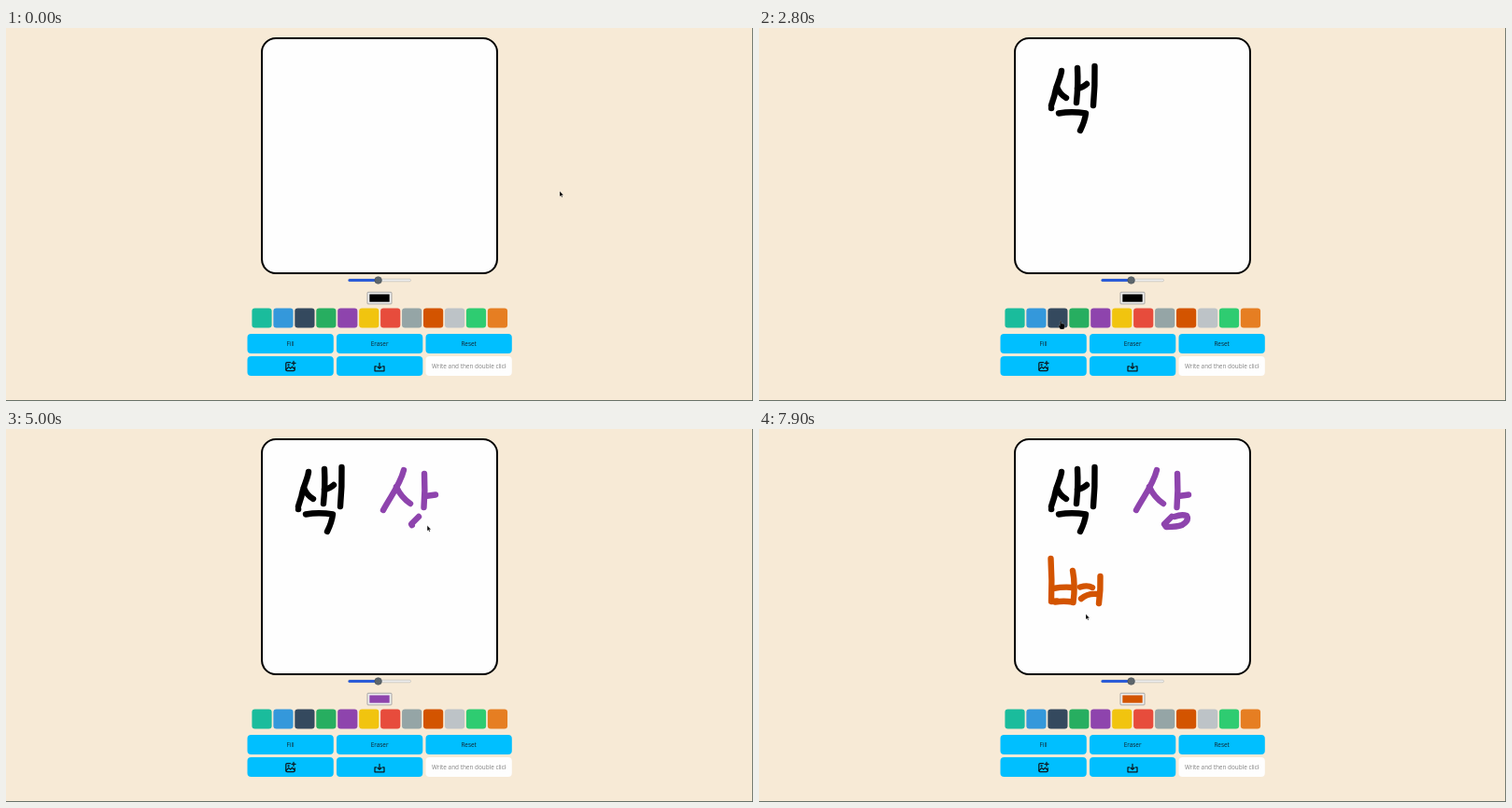
These frames come from a looping animation (800 px wide and 400 px high, 8 s). An HTML page:

```html
<!DOCTYPE html>
<html lang="en">
<head>
<meta charset="utf-8">
<title>Drawing board</title>
<style>
  html, body { margin: 0; width: 100%; height: 100%; overflow: hidden; background: #f7ead6; }
  svg { display: block; width: 800px; height: 400px; }
  text { font: 6.4px "Open Sans", "Noto Sans", sans-serif; fill: #10232c; }
  .hint { fill: #808080; }
  .icon { fill: none; stroke: #0b1a22; stroke-width: 1.25; stroke-linecap: round; stroke-linejoin: round; }
  #ink path { fill: none; stroke-width: 6.4; stroke-linecap: round; stroke-linejoin: round; }
</style>
</head>
<body>
<svg viewBox="0 0 800 400">
  <defs><clipPath id="field"><rect x="455" y="354" width="80.3" height="18"/></clipPath></defs>
  <rect width="800" height="400" fill="#f7ead6"/>
  <path d="M0 399.5H800M799.6 0V400" stroke="#59645c" stroke-width=".9"/>
  <rect x="274" y="11" width="252" height="252" rx="15" fill="#fefefe" stroke="#000" stroke-width="2"/>
  <g id="ink"></g>

  <rect x="366.5" y="269.2" width="67" height="2.6" rx="1.3" fill="#efefef" stroke="#b5b5b0" stroke-width=".6"/>
  <rect x="366.5" y="269" width="32" height="3" rx="1.5" fill="#2a5bd7"/>
  <circle cx="398.6" cy="270.5" r="3.8" fill="#5d666c" stroke="#454d55" stroke-width=".6"/>

  <rect x="387" y="283.3" width="26" height="12.6" rx=".8" fill="#efefef" stroke="#8a8a8a" stroke-width=".7"/>
  <rect id="picked" x="389.3" y="285.5" width="21.4" height="8.2"/>
  <g id="swatches"></g>
  <g id="buttons"></g>

  <g class="icon">
    <path d="M304.5 358.5H301Q299.8 358.5 299.8 359.7V366.5Q299.8 367.7 301 367.7H308Q309.2 367.7 309.2 366.5V363.5"/>
    <path d="M300 366.3L302.8 363.4L304.6 365.1L306.5 363.2L309 365.8M308 357.4V361.4M306 359.4H310"/>
    <circle cx="302.6" cy="361.3" r=".5"/>
    <path d="M396.5 362.8H395V367.8H405V362.8H403.5M400 359.3V365M398 363.2L400 365.2L402 363.2"/>
  </g>
  <text class="hint" x="456" y="365.4" clip-path="url(#field)">Write and then double click</text>
  <path id="caret" d="M456.5 359V367" stroke="#222" stroke-width=".8"/>

  <g id="cursor">
    <path id="arrow" d="M0 0V5.7L1.3 4.6L2.2 6.6L3.1 6.2L2.2 4.2H4Z" fill="#000" stroke="#fff" stroke-width=".25"/>
    <path id="hand" d="M0 .5Q.8 -.4 1.5 .5V3Q3.5 2.6 5 3.8V6.5L4.2 9H.4L-1.7 5.7Q-1.6 4.4 0 5.3Z" fill="#050505" stroke="#ddd" stroke-width=".25"/>
  </g>
</svg>
<script>
const LOOP = 8000, STEP = 100, INK_LAG = 100;
const BLACK = "#000000", PURPLE = "#8e44ad", ORANGE = "#d35400";
const PALETTE = ["#1abc9c", "#3498db", "#34495e", "#27ae60", PURPLE, "#f1c40f",
                 "#e74c3c", "#95a5a6", ORANGE, "#bdc3c7", "#2ecc71", "#e67e22"];
const $ = id => document.getElementById(id);

function add(parent, tag, attrs, text) {
  const node = document.createElementNS("http://www.w3.org/2000/svg", tag);
  for (const key in attrs) node.setAttribute(key, attrs[key]);
  if (text) node.textContent = text;
  return parent.appendChild(node);
}

PALETTE.forEach((fill, i) => add($("swatches"), "rect",
  { x: 263.4 + i * 22.95, y: 300.4, width: 21.2, height: 21, rx: 3.2, fill }));

["Fill", "Eraser", "Reset", "", "", ""].forEach((label, i) => {
  const x = 258.5 + (i % 3) * 95.5, y = i < 3 ? 328 : 352;
  add($("buttons"), "rect", { x, y, width: 92.3, height: 21, rx: 4, fill: i === 5 ? "#fefefe" : "#00bfff" });
  add($("buttons"), "text", { x: x + 46.1, y: y + 13, "text-anchor": "middle" }, label);
});

// Pointer gestures: start, end, path, ink colour (none for a resting pointer).
const gestures = [
  [0, 100, "M593 175h.1"],
  [480, 800, "M324 46C323 54 318 62 316.5 72L313 83", BLACK],
  [900, 960, "M313 86h.1", BLACK],
  [1080, 1220, "M319 63Q322 71 329 75", BLACK],
  [1330, 1500, "M341 43Q342 60 340 80", BLACK],
  [1580, 1660, "M341 65Q347 64 351 60", BLACK],
  [1800, 1960, "M359.5 41Q360 62 358 83", BLACK],
  [2060, 2400, "M321 91.5Q335 89 350 91.5Q349 100 344 110", BLACK],
  [2700, 2850, "M322 314h.5"],
  [3050, 3300, "M366 309h.5"],
  [3500, 3600, "M380 268l1 -4"],
  [3930, 4190, "M426 44C422 60 412 72 404 87", PURPLE],
  [4250, 4400, "M418 62Q423 73 433 80", PURPLE],
  [4480, 4640, "M448 48Q449 66 447.5 84", PURPLE],
  [4690, 4770, "M449 72L460 70.5", PURPLE],
  [4827, 5160, "M442 94L434 102L436 105Q448 105 453 103Q461 98 458 93Q453 91 445 94", PURPLE],
  [5400, 5420, "M440 226h.1"],
  [5900, 6250, "M457 310h.5"],
  [6430, 6560, "M312.5 139Q314 163 313 185L319 184.5", ORANGE],
  [6600, 6700, "M336 152Q339 168 336.5 186", ORANGE],
  [6800, 6801, "M330 184h.1"],
  [6880, 6970, "M315 171Q326 169 336 170", ORANGE],
  [7050, 7160, "M317 185.5Q326 184 336 185.5", ORANGE],
  [7320, 7430, "M344 169.5Q352 167 357 170", ORANGE],
  [7490, 7580, "M345 182Q352 176 362 177", ORANGE],
  [7640, 7760, "M365.5 158Q366 173 364 187", ORANGE],
  [7900, 8000, "M350 198.5h.1"]
].map(([start, end, d, color]) => {
  const path = add($("ink"), "path", { d, stroke: color || "none" });
  return { start, end, color, path, length: path.getTotalLength() };
});

const progress = (g, t) => Math.min(1, Math.max(0, (t - g.start) / (g.end - g.start)));
const pointOn = (g, t) => g.path.getPointAtLength(progress(g, t) * g.length);

function pointerAt(t) {
  const next = gestures.findIndex(g => g.start > t);
  const current = gestures[next < 0 ? gestures.length - 1 : next - 1];
  const a = pointOn(current, t);
  if (t <= current.end || next < 0) return a;
  const follow = gestures[next], b = pointOn(follow, t);
  const k = (t - current.end) / (follow.start - current.end), ease = k * k * (3 - 2 * k);
  return { x: a.x + (b.x - a.x) * ease, y: a.y + (b.y - a.y) * ease };
}

function show(node, visible) {
  node.style.display = visible ? "" : "none";
}

function draw(t) {
  for (const g of gestures) {
    const p = progress(g, t - INK_LAG);
    show(g.path, g.color && p > 0);
    g.path.setAttribute("stroke-dasharray", `${p * g.length + .01} ${g.length + 10}`);
  }
  const { x, y } = pointerAt(t);
  const onControl = y > 266 && y < 324;
  $("cursor").setAttribute("transform", `translate(${x} ${y})`);
  show($("arrow"), !onControl);
  show($("hand"), onControl);
  show($("caret"), t >= 600 && t < 1900);
  $("picked").setAttribute("fill", t < 3200 ? BLACK : t < 6100 ? PURPLE : ORANGE);
}

const origin = performance.now();
function tick() {
  const t = (performance.now() - origin) % LOOP;
  draw(Math.floor(t / STEP) * STEP);
  requestAnimationFrame(tick);
}
tick();
</script>
</body>
</html>
```
